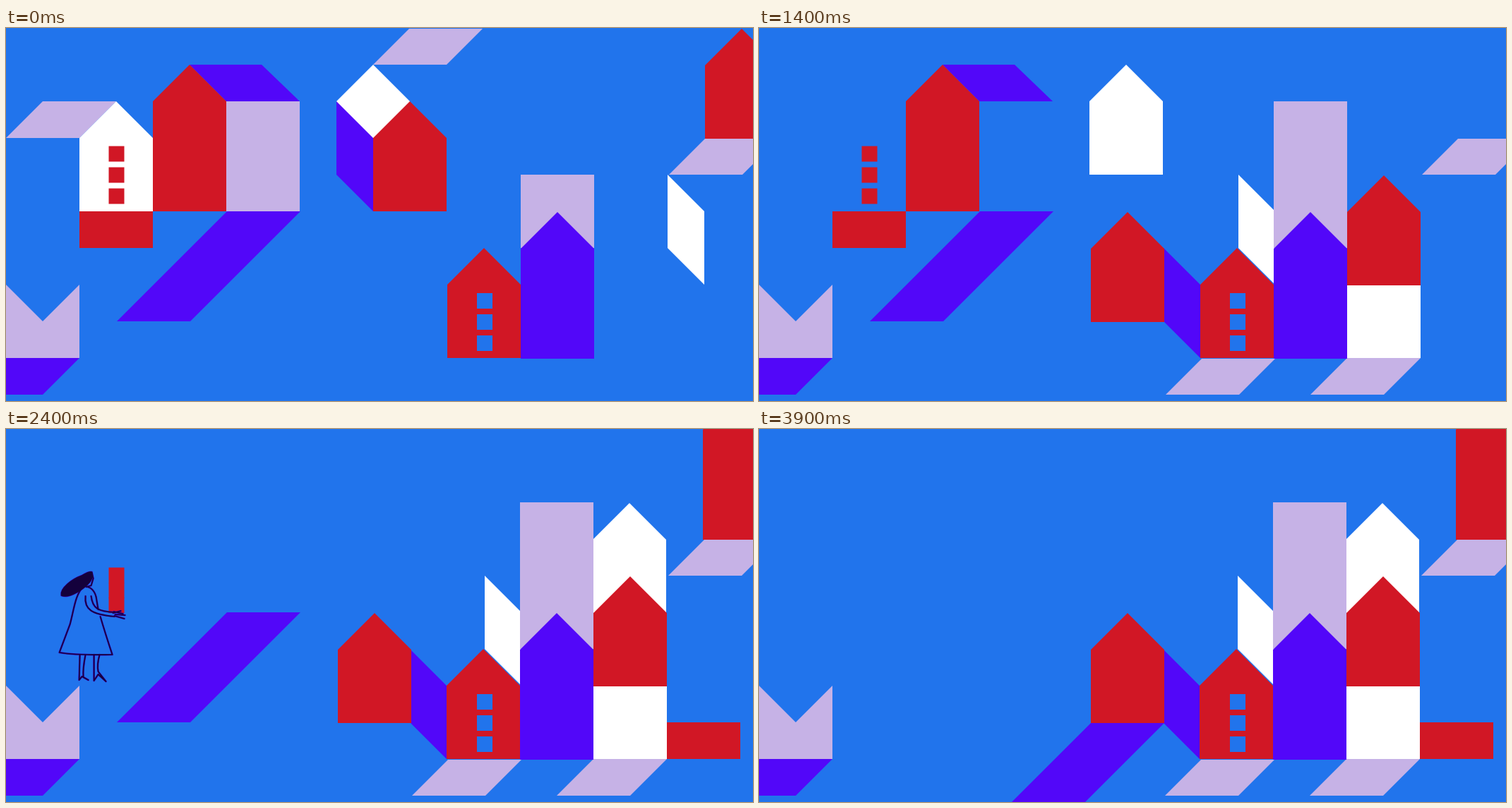
Write an HTML page with a canvas that moves like this. It is 1058 px wide and 529 px high and loops after 4 s.

```html
<!DOCTYPE html>
<html lang="en">
<head>
<meta charset="utf-8">
<title>Building blocks</title>
<style>
html, body { margin: 0; overflow: hidden; background: #2174ec; }
canvas { display: block; }
</style>
</head>
<body>
<canvas id="stage" width="1058" height="529"></canvas>
<script>
const ctx = document.getElementById('stage').getContext('2d');
const LOOP = 4000, STEP = 100;
const blue = '#2174ec', red = '#d11725', violet = '#5207f9', lilac = '#c6b2e6', white = '#fff';

// Shapes start at the top left corner of their box.
const house = h => `M0 52L52 0L104 52V${h}H0Z`;
const box = (w, h) => `M0 0H${w}V${h}H0Z`;
const shadow = h => `M${h} 0H${h + 104}L104 ${h}H0Z`;
const side = 'M0 0L52 52V156L0 104Z';

// Back to front. A block jumps to its new place at the time `at`.
const block = (color, path, x, y, at = Infinity, toX = x, toY = y) =>
  ({ color, path: new Path2D(path), x, y, at, toX, toY });

const blocks = [
  block(lilac, 'M0 0L52 52L104 0V104H0Z', 0, 364),
  block(violet, 'M0 0H104L52 52H0Z', 0, 468),
  block(lilac, shadow(51), 939, 157),
  block(lilac, shadow(51), 520, 1, 1300, 576, 469),
  block(lilac, shadow(52), 0, 104, 1400, 781, 468),
  block(white, side, 937, 208, 900, 679, 208),
  block(white, house(156), 468, 52, 1900, 832, 105),
  block(violet, shadow(156), 157, 260, 2500, 314, 417),
  block(violet, side, 468, 104, 800, 573, 312),
  block(red, house(156), 520, 104, 1200, 470, 261),
  block(violet, 'M0 0H102L156 52H52Z', 260, 52, 2300, 1040, -52),
  block(red, house(208), 208, 52, 2200, 988, -51),
  block(white, house(156), 104, 104, 200, 833, 312),
  block(red, house(156), 990, 1, 600, 833, 209),
  block(red, box(104, 52), 104, 260, 1500, 937, 416),
  block(lilac, box(104, 156), 312, 104, 400, 729, 104),
  block(lilac, box(104, 104), 729, 208),
  block(red, house(156), 625, 312),
  block(violet, house(208), 729, 261)
];

const WOMAN_IN = 1600, WOMAN_OUT = 2600;
const hair = new Path2D('M79 236C77 226 94 213 108 208Q118 202 122 203Q125 212 115 221C104 231 88 240 79 236Z');
const figure = new Path2D(
  'M122 204L124 212L121 222L114 224' +
  'M110 223C98 236 97 255 91 277L76 317Q100 321 151 320Q141 290 134 266' +
  'M110 223Q124 223 128 238L131 256' +
  'M113 237C111 256 122 263 154 266M121 237C123 254 130 259 155 260' +
  'M152 261L163 258M155 263L169 264M154 265L168 269M153 259L166 262' +
  'M105 320L104 356L108 351L117 356L110 352Q109 340 113 320' +
  'M125 320L125 357L131 348L142 358L131 344Q129 334 133 320');

function drawWoman(wobble) {
  ctx.save();
  ctx.translate(wobble * .4, 0);
  ctx.lineCap = ctx.lineJoin = 'round';
  for (const [color, width] of [['#3c05c6', 2.6], ['#14003c', 1.7]]) {
    ctx.strokeStyle = ctx.fillStyle = color;
    ctx.lineWidth = width;
    ctx.stroke(figure);
    ctx.stroke(hair);
    ctx.fill(hair);
  }
  ctx.restore();
}

function drawSquares(color, x, tops) {
  ctx.fillStyle = color;
  for (const y of tops) ctx.fillRect(x, y, 22, 22);
}

function draw(time) {
  const step = Math.floor(time / STEP), now = step * STEP;
  const wobble = step && step % 3 === 0 ? -1 : 0;
  ctx.fillStyle = blue;
  ctx.fillRect(0, 0, 1058, 529);

  for (const b of blocks) {
    const moved = now >= b.at;
    const x = moved ? b.toX : b.x, y = moved ? b.toY : b.y;
    ctx.save();
    ctx.translate(x + (x > 570 ? wobble : 0), y);
    ctx.fillStyle = b.color;
    ctx.fill(b.path);
    ctx.restore();
  }
  drawSquares(blue, 667, [376, 406, 436]);

  // The loose squares drop into her hands, the lowest first.
  if (now < WOMAN_OUT) {
    drawSquares(red, 145.5, [
      now < 2100 ? 167.5 : 196.5,
      now < 2000 ? 197.5 : 218,
      now < 1900 ? 227.5 : 239
    ]);
    if (now >= WOMAN_IN) drawWoman(wobble);
  }
}

function tick() {
  draw(performance.now() % LOOP);
  requestAnimationFrame(tick);
}
tick();
</script>
</body>
</html>
```
